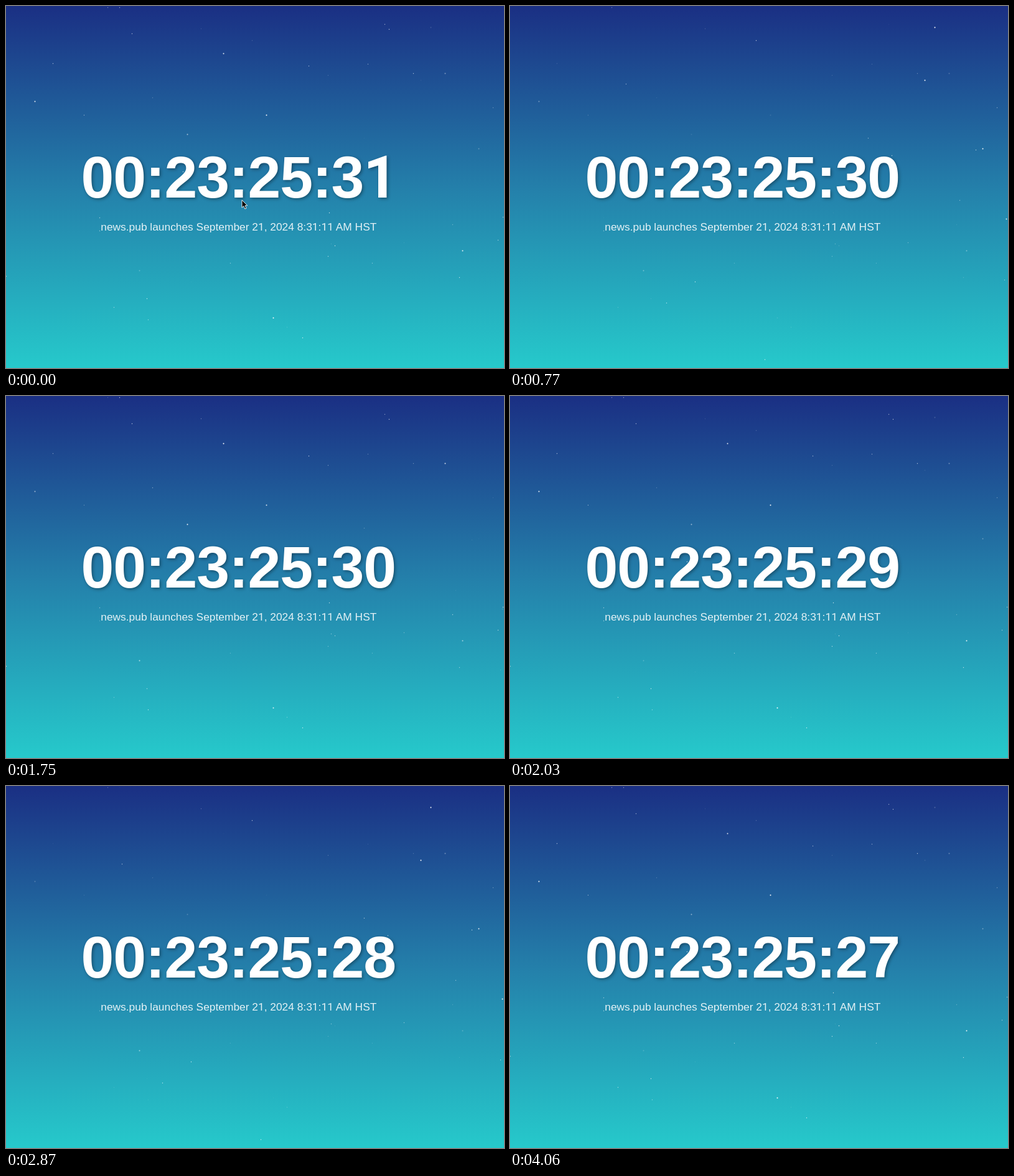
An HTML page for the animation above (4.13 s loop, 800 by 582 pixels).

```html
<!DOCTYPE html>
<html lang="en">
<head>
<meta charset="utf-8">
<title>Countdown</title>
<style>
  html, body { margin: 0; width: 100%; height: 100%; overflow: hidden; background: #1b2f83; }
  svg { display: block; width: 800px; height: 582px; font-family: "Liberation Sans", Arial, sans-serif; }
  .one { font-family: Roboto, Inter, sans-serif; }
  #clock { font-size: 95px; font-weight: 700; letter-spacing: -1.1px; fill: #fff; text-shadow: 2px 2px 5px rgba(0, 0, 0, .36); }
  #note { font-size: 17.35px; fill: #fff; fill-opacity: .88; }
</style>
</head>
<body>
<svg viewBox="0 0 800 582">
  <defs>
    <linearGradient id="sky" gradientUnits="userSpaceOnUse" x1="0" y1="-12" x2="0" y2="608">
      <stop offset="0" stop-color="#1a2c82"/>
      <stop offset=".5" stop-color="#2481ab"/>
      <stop offset="1" stop-color="#26d0ce"/>
    </linearGradient>
  </defs>
  <rect width="800" height="582" fill="url(#sky)"/>
  <g id="stars" fill="#fff"></g>
  <text id="clock" x="120.6" y="308"></text>
  <text id="note" x="152.3" y="361"></text>
  <path id="cursor" d="M379 312v12.2l2.8-2.6 2 4.6 2.2-1-2-4.4h3.7z" fill="#000" stroke="#fff" stroke-width=".9"/>
</svg>
<script>
const LOOP = 4130, STEP = 70, TWINKLE = 2000;
const FIRST_TICK = 760, CURSOR_END = 350, FAINT_STARS = 50;

// The brightest stars: x, y, time of peak glow.
const BRIGHT = [
  [418, 175, 0], [429, 501, 0], [46, 153, 200], [733, 393, 200],
  [682, 34, 740], [759, 229, 640], [666, 119, 850], [797, 342, 1000],
  [214, 425, 1350], [705, 108, 1450], [291, 206, 1560], [349, 76, 1780]
];

const byId = id => document.getElementById(id);
const clock = byId("clock"), cursor = byId("cursor"), field = byId("stars");
const stars = [];

// Numeral one is set in a face without a foot serif.
function setText(el, text) {
  if (el.dataset.text === text) return;
  el.dataset.text = text;
  el.innerHTML = text.replace(/1/g, '<tspan class="one">1</tspan>');
}

function addStar(x, y, peak, radius, strength) {
  const el = document.createElementNS(field.namespaceURI, "circle");
  el.setAttribute("cx", x + .5);
  el.setAttribute("cy", y + .5);
  el.setAttribute("r", radius);
  field.append(el);
  stars.push({ el, peak, strength });
}

let seed = 21;
function random() {
  seed = (seed * 16807) % 2147483647;
  return seed / 2147483647;
}

for (const [x, y, peak] of BRIGHT) addStar(x, y, peak, 1, 1);
for (let i = 0; i < FAINT_STARS; i++) {
  const x = Math.floor(random() * 800), y = Math.floor(random() * 570);
  addStar(x, y, random() * TWINKLE, .7, .5 + .3 * random());
}

function draw(now) {
  const t = Math.floor((now % LOOP) / STEP) * STEP;
  const ticks = Math.max(0, 1 + Math.floor((t - FIRST_TICK) / 1000));
  setText(clock, "00:23:25:" + (31 - ticks));
  cursor.style.display = t < CURSOR_END ? "" : "none";
  for (const { el, peak, strength } of stars) {
    const glow = .5 + .5 * Math.cos((t - peak) / TWINKLE * 2 * Math.PI);
    el.setAttribute("opacity", (glow * strength).toFixed(3));
  }
}

setText(byId("note"), "news.pub launches September 21, 2024 8:31:11 AM HST");

const start = performance.now();
function tick() {
  draw(performance.now() - start);
  requestAnimationFrame(tick);
}
tick();
</script>
</body>
</html>
```
